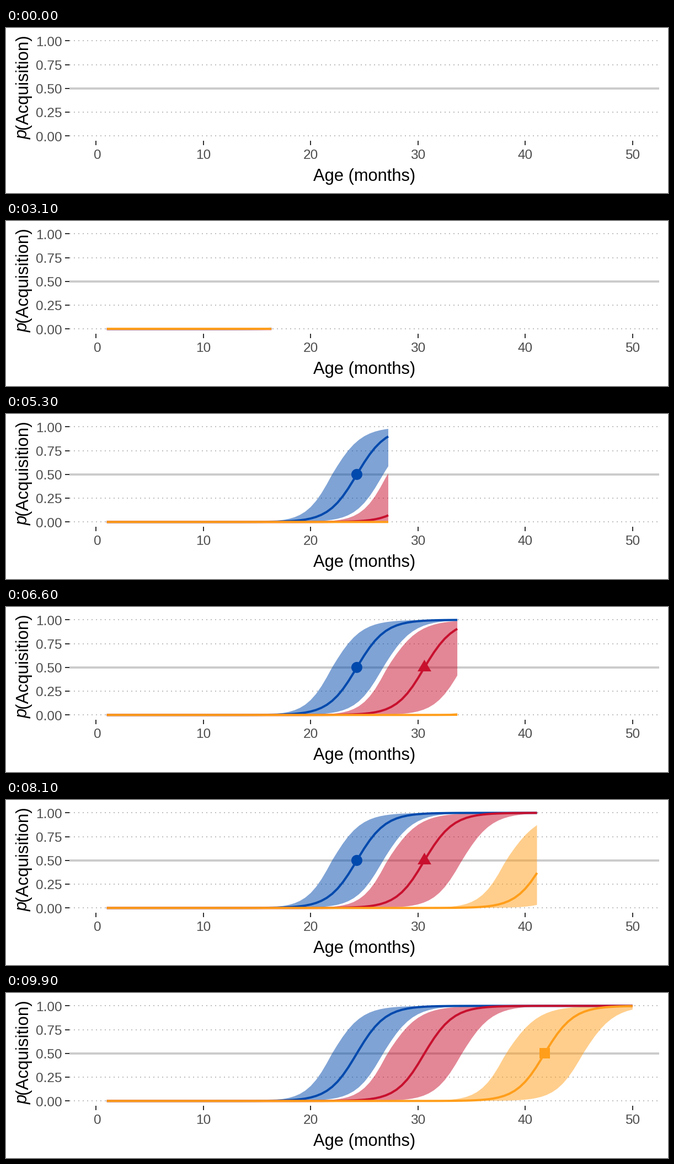
A matplotlib script for the animation above (10000 ms loop, 1200 by 300 pixels).

```python
import numpy as np
import matplotlib.pyplot as plt
from matplotlib.animation import FuncAnimation
from matplotlib.patches import Circle, Polygon, Rectangle

WIDTH, HEIGHT, DPI = 1200, 300, 200
FRAMES, INTERVAL = 100, 100
FIRST_AGE, LAST_AGE, SAMPLE = 1, 50, 0.5
LEFT, RIGHT = 115, 1184
PX = 72 / DPI  # points per pixel

plt.rcParams["font.family"] = "Liberation Sans"

# colour, marker, then (midpoint, slope below it, slope above it)
# for the upper bound, the median and the lower bound
GROUPS = [
    ("#0049ad", "circle", (22.0, 0.84, 0.74), (24.3, 0.76, 0.75), (26.75, 0.79, 0.72)),
    ("#c8102e", "triangle", (27.15, 0.86, 0.68), (30.6, 0.77, 0.74), (34.1, 0.79, 0.72)),
    ("#ff9e1b", "square", (38.2, 0.84, 0.66), (41.8, 0.76, 0.74), (45.4, 0.79, 0.70)),
]


def to_x(age):
    return 163.3 + 19.45 * np.asarray(age, float)


def to_y(p):
    return 196.3 - 172.9 * np.asarray(p, float)


def curve(ages, mid, below, above):
    """Logistic growth, sampled evenly and joined by straight segments."""
    samples = np.arange(FIRST_AGE, LAST_AGE + SAMPLE, SAMPLE)
    d = samples - mid
    p = 1 / (1 + np.exp(-np.where(d < 0, below, above) * d))
    return np.interp(ages, samples, p)


def make_marker(shape, age, color):
    x, y = float(to_x(age)), float(to_y(0.5))
    style = dict(facecolor=color, edgecolor="none", zorder=6)
    if shape == "circle":
        return Circle((x, y), 10, **style)
    if shape == "square":
        return Rectangle((x - 9.5, y - 9.5), 19, 19, **style)
    return Polygon([(x, y - 14), (x + 12.4, y + 7.2), (x - 12.4, y + 7.2)], **style)


fig = plt.figure(figsize=(WIDTH / DPI, HEIGHT / DPI), dpi=DPI, facecolor="white")
ax = fig.add_axes([0, 0, 1, 1])
ax.set_xlim(0, WIDTH)
ax.set_ylim(HEIGHT, 0)
ax.axis("off")


def rule(xs, ys, width, color, **style):
    return ax.plot(xs, ys, color=color, lw=width * PX,
                   solid_capstyle="butt", dash_capstyle="butt", **style)[0]


def draw_axes():
    for p in (0, 0.25, 0.5, 0.75, 1):
        y = float(to_y(p))
        if p != 0.5:
            rule([LEFT, RIGHT], [y, y], 2, "#bebebe", ls=(0, (1, 3)), zorder=1)
        rule([107, LEFT], [y, y], 2, "#333333", zorder=1)
        ax.text(101.5, y + 9.2, f"{p:.2f}", size=8.8, color="#4d4d4d",
                ha="right", va="baseline")
    rule([LEFT, RIGHT], [to_y(0.5)] * 2, 4, "#cccccc", zorder=2)

    for age in range(0, 51, 10):
        x = float(to_x(age))
        rule([x, x], [205, 213], 2, "#333333", zorder=1)
        ax.text(x + (3 if age == 0 else 0), 238, str(age), size=8.8,
                color="#4d4d4d", ha="center", va="baseline")

    ax.text(649.5, 278, "Age (months)", size=11.1, ha="center", va="baseline")
    upright = dict(size=11.3, rotation=90, rotation_mode="anchor",
                   ha="left", va="baseline")
    ax.text(38.5, 202, "p", style="italic", **upright)
    ax.text(38.5, 184.5, "(Acquisition)", **upright)


draw_axes()

ribbons, medians, markers = [], [], []
for order, (color, shape, upper, median, lower) in enumerate(GROUPS):
    ribbon = Polygon([(0, 0)] * 3, facecolor=color, edgecolor="none",
                     alpha=0.5, zorder=3)
    marker = make_marker(shape, median[0], color)
    ax.add_patch(ribbon)
    ax.add_patch(marker)
    ribbons.append(ribbon)
    markers.append(marker)
    medians.append(rule([], [], 4, color, zorder=4 + order / 10))


def update(frame):
    step = (LAST_AGE - FIRST_AGE) / (FRAMES - 1)
    now = FIRST_AGE + step * frame
    ages = np.append(np.arange(FIRST_AGE, now, SAMPLE), now)
    xs = to_x(ages)
    for i, (_, _, upper, median, lower) in enumerate(GROUPS):
        top, bottom = to_y(curve(ages, *upper)), to_y(curve(ages, *lower))
        ribbons[i].set_xy(np.column_stack([np.r_[xs, xs[::-1]],
                                           np.r_[top, bottom[::-1]]]))
        medians[i].set_data(xs, to_y(curve(ages, *median)))
        # only the latest marker stays once the reveal is complete
        finished = frame == FRAMES - 1
        markers[i].set_visible(now >= median[0]
                               and (not finished or i == len(GROUPS) - 1))
    return ribbons + medians + markers


anim = FuncAnimation(fig, update, frames=FRAMES, interval=INTERVAL,
                     init_func=lambda: update(0), repeat=True, repeat_delay=0)
plt.show()
```
